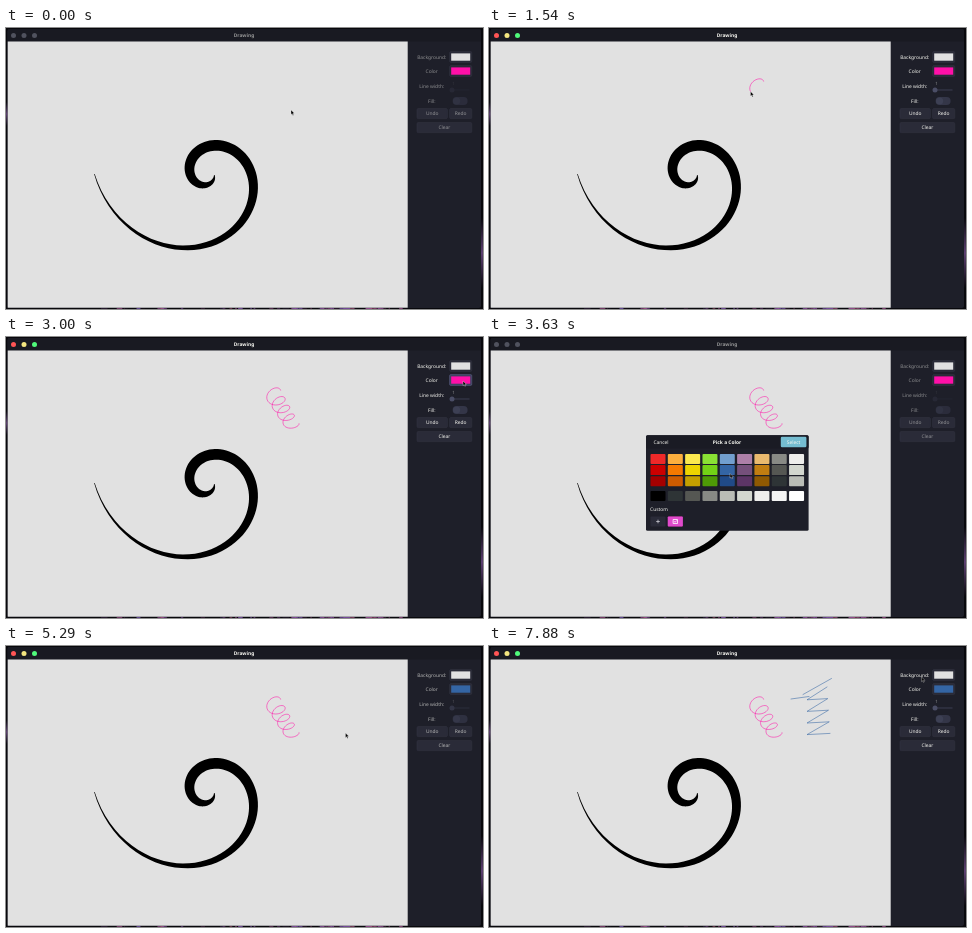
An HTML page that plays this animation: 477x281 px, repeating every 8 s.

```html
<!DOCTYPE html>
<html lang="en">
<head>
<meta charset="utf-8">
<title>Drawing</title>
<style>
  html, body { margin: 0; width: 100%; height: 100%; overflow: hidden; background: #08080c; }
  svg { display: block; width: 477px; height: 281px; }
  text {
    font: 4.9px "Noto Sans", "Open Sans", sans-serif;
    fill: #f8f8f2; text-anchor: middle; text-rendering: geometricPrecision;
  }
  .bold { font-weight: 700; }
  .box { fill: #2a2b38; stroke: #343645; stroke-width: .5; }
  .hover { fill: #3f4260; stroke: #62668f; }
  .pen { fill: none; stroke-width: .55; stroke-linecap: round; stroke-linejoin: round; }
</style>
</head>
<body>
<svg viewBox="0 0 477 281">
  <defs>
    <linearGradient id="glow" x2="0" y2="1">
      <stop offset="0" stop-color="#08080c"/>
      <stop offset=".5" stop-color="#5c3f70"/>
      <stop offset="1" stop-color="#08080c"/>
    </linearGradient>
  </defs>

  <!-- desktop showing around the window -->
  <rect width="477" height="281" fill="#08080c"/>
  <rect y="74" width="2" height="24" fill="url(#glow)"/>
  <rect x="475" y="190" width="2" height="70" fill="url(#glow)"/>
  <g id="specks"></g>

  <!-- window -->
  <rect x="1.5" y="1" width="473.5" height="279" rx="2" fill="#1e1f29"/>
  <path d="M1.5 13.5V3a2 2 0 0 1 2-2H473a2 2 0 0 1 2 2V13.5z" fill="#191a22"/>
  <g id="lights"></g>
  <text id="title" class="bold" x="238" y="9.3">Drawing</text>
  <rect x="1.7" y="13.5" width="400" height="266.2" fill="#e1e1e1"/>
  <path id="spiral"/>
  <g id="strokes"></g>

  <!-- side panel -->
  <g id="labels"></g>
  <g id="slider">
    <text x="447.5" y="56.5" style="font-size:4.4px" opacity=".5">1</text>
    <path d="M445 62H463.5" stroke="#3b3d50"/>
    <circle cx="446" cy="62" r="2.5" fill="#4b4e66"/>
  </g>
  <g id="wells"></g>
  <g id="toggle">
    <rect x="446.6" y="69" width="15" height="8" rx="4" fill="#343648"/>
    <circle cx="450.6" cy="73" r="3.6" fill="#3d4054"/>
  </g>
  <g id="buttons"></g>

  <!-- colour dialog -->
  <g id="dialog">
    <rect x="157" y="98.2" width="162.6" height="95.6" rx="1.5" fill="#1e1f29"/>
    <rect x="157" y="98.2" width="162.6" height="13.3" rx="1.5" fill="#1a1b24"/>
    <text x="172" y="106.8">Cancel</text>
    <text class="bold" x="238" y="106.8">Pick a Color</text>
    <rect x="291.8" y="99.8" width="25.6" height="10.4" rx="1.2" fill="#75bdd1"/>
    <text x="304.6" y="106.8">Select</text>
    <text x="170" y="173.7">Custom</text>
    <g id="swatches"></g>
    <path d="M167.2 184.5h3.6m-1.8-1.8v3.6" stroke="#c9cad2" stroke-width=".8"/>
    <g id="mark">
      <rect x="-7.6" y="-5" width="15.2" height="10" rx=".8" fill="#bd93f9" opacity=".45"/>
      <path d="M-2.2-2h4.4v4h-4.4zM-1.1-.2L-.2.8 1.5-1.1" fill="none" stroke="#fff" stroke-width=".8"/>
    </g>
  </g>

  <path id="cursor" d="M0 0V4.6L1.1 3.7 1.9 5.4 2.7 5 1.9 3.4 3.3 3.3z" fill="#000"
    stroke="#eee" stroke-width=".35" stroke-linejoin="round"/>
</svg>

<script>
const LOOP = 8000, PINK = '#ff10a8', BLUE = '#3465a4';
const ACTIVATE = 780, OPEN = 3100, PICK = 3780, CLOSE = 5280;
const $ = id => document.getElementById(id);
const clamp = v => Math.max(0, Math.min(1, v));
const ramp = (t, a, b) => clamp((t - a) / (b - a));
const mix = (a, b, f) => a + (b - a) * f;
const sample = (n, fn) => Array.from({ length: n + 1 }, (_, i) => fn(i / n, i));
const line = points => 'M' + points.join('L');

function set(el, attrs) {
  for (const k in attrs) el.setAttribute(k, attrs[k]);
  return el;
}

function add(parent, tag, attrs, text = '') {
  const el = set(document.createElementNS('http://www.w3.org/2000/svg', tag), attrs);
  el.textContent = text;
  return $(parent).appendChild(el);
}

// bright bits of wallpaper below the window
let seed = 7;
const random = () => (seed = seed * 16807 % 2147483647) / 2147483647;
for (let i = 0; i < 60; i++) {
  add('specks', 'rect', {
    x: 95 + 300 * random(), y: 280, width: 1 + 6 * random(), height: 1,
    fill: `hsl(${260 + 80 * random()} 35% 45%)`, opacity: random()
  });
}

// logarithmic spiral, thickest in the middle
function spiralEdge(side) {
  return sample(120, u => {
    const a = mix(.12, 3 * Math.PI, u);
    const r = 113 * Math.exp(.3 * (a - 3 * Math.PI)) + side * (.3 + 5.3 * Math.sin(Math.PI * u));
    return [201.4 + r * Math.cos(a), 146.1 + r * Math.sin(a)];
  });
}
set($('spiral'), { d: line([...spiralEdge(1), ...spiralEdge(-1).reverse()]) + 'z' });

const lights = ['#ff5555', '#f4e680', '#50fa7b'].map((color, i) =>
  ({ color, el: add('lights', 'circle', { cx: 7.5 + 10.5 * i, cy: 7.5, r: 2.5 }) }));

['Background:', 'Color', 'Line width:', 'Fill:'].forEach((s, i) =>
  add('labels', 'text', { x: 425.7, y: 30.7 + 14.7 * i }, s));

const wells = ['#e1e1e1', PINK].map((fill, i) => {
  const y = 23.6 + 14 * i;
  const frame = add('wells', 'rect', { class: 'box', x: 443.6, y, width: 22.2, height: 10.8, rx: 1.2 });
  const ink = add('wells', 'rect', { x: 445.2, y: y + 1.8, width: 19, height: 7.3, fill });
  return { y, frame, ink };
});

const captions = [['Undo', 411, 80.6, 30.4], ['Redo', 443.6, 80.6, 22.2], ['Clear', 411, 94.6, 54.8]]
  .map(([s, x, y, width]) => {
    add('buttons', 'rect', { class: 'box', x, y, width, height: 10, rx: 1.2 });
    return add('buttons', 'text', { x: x + width / 2, y: y + 6.7 }, s);
  });

const spot = (col, row) => [169 + 17.32 * col, [122, 133.1, 144.2, 159, 184.5][row]];
[
  'ef2929 fcaf3e fce94f 8ae234 729fcf ad7fa8 e9b96e 888a85 eeeeec',
  'cc0000 f57900 edd400 73d216 3465a4 75507b c17d11 555753 d3d7cf',
  'a40000 ce5c00 c4a000 4e9a06 204a87 5c3566 8f5902 2e3436 babdb6',
  '000000 2e3436 555753 888a85 babdb6 d3d7cf eeeeec f3f3f3 ffffff',
  '2a2b38 ff10a8'
].forEach((colors, row) => colors.split(' ').forEach((c, col) => {
  const [x, y] = spot(col, row);
  add('swatches', 'rect', { x: x - 7.5, y: y - 5, width: 15, height: 10, rx: .9, fill: '#' + c });
}));

// four shrinking, tilted loops sliding down to the right
const curl = sample(120, u => {
  const a = 8 * Math.PI * u;
  const x = mix(8, 6.5, u) * Math.cos(a), y = -mix(6, 4, u) * Math.sin(a);
  return [mix(266.5, 286.5, u) + x + .3 * y, mix(56, 89, u) + y - .35 * x];
});
const zigzag = sample(8, (u, i) => i % 2 ? [318, 48 + 5.8 * i] : [mix(338, 341, u), 41 + 5.8 * i]);

const strokes = [
  [1300, 2160, PINK, curl],
  [6090, 6262, BLUE, [[342.5, 32.5], [314, 48.5]]],
  [6280, 6450, BLUE, [[302, 53], [320, 50.5]]],
  [6480, 7220, BLUE, zigzag]
].map(([from, to, stroke, points]) => {
  const el = add('strokes', 'path', { class: 'pen', stroke, d: line(points) });
  return { from, to, el, points, len: el.getTotalLength() };
});

// pointer stops: time, x, y; the ends of each stroke join them
const stops = [
  [0, 285, 82], [ACTIVATE, 275, 52.5], [2440, 457, 44], [3000, 457, 44], [3600, 241, 136.5],
  [3920, 241, 136.5], [4630, 304, 105], [5060, 339, 95.5], [6060, 342.5, 32.5],
  [7410, 436, 31], [7700, 447, 30], [7870, 432.6, 31],
  ...strokes.flatMap(s => [[s.from, ...s.points[0]], [s.to, ...s.points.at(-1)]])
].sort((a, b) => a[0] - b[0]);

// screen refreshes: first, last, count
const refreshes = [
  [40, 1080, 23], [1420, 2460, 8], [3000, 3920, 7], [4080, 4080, 1],
  [4420, 5290, 5], [5500, 6460, 6], [6580, 7420, 6], [7710, 7880, 2]
];

function lastRefresh(t) {
  const run = refreshes.filter(r => r[0] <= t).pop();
  if (!run) return 0;
  const [a, b, n] = run;
  if (t >= b) return b;
  const step = (b - a) / (n - 1);
  return a + Math.floor((t - a) / step + 1e-6) * step;
}

function pointer(t) {
  const s = strokes.find(s => t >= s.from && t <= s.to);
  if (s) {
    const p = s.el.getPointAtLength(s.len * ramp(t, s.from, s.to));
    return [p.x, p.y];
  }
  const i = stops.findIndex(k => k[0] > t);
  if (i < 0) return stops.at(-1).slice(1);
  const [a, b] = [stops[i - 1], stops[i]], f = ramp(t, a[0], b[0]);
  const eased = f * f * (3 - 2 * f);
  return [mix(a[1], b[1], eased), mix(a[2], b[2], eased)];
}

function render(now) {
  const t = lastRefresh(now % LOOP);
  const active = t >= ACTIVATE && t < OPEN || t >= CLOSE;
  const lit = ramp(t, 880, 1060) - ramp(t, OPEN, OPEN + 350) + ramp(t, CLOSE - 80, CLOSE + 170);
  const [x, y] = pointer(t);

  lights.forEach(({ el, color }) => set(el, { fill: active ? color : '#50525e' }));
  set($('title'), { opacity: active ? 1 : .55 });
  [$('labels'), ...captions].forEach(el => set(el, { opacity: mix(.5, 1, lit) }));
  set($('slider'), { opacity: mix(.2, 1, lit) });
  set($('toggle'), { opacity: mix(.6, 1, lit) });
  set(wells[1].ink, { fill: t < CLOSE ? PINK : BLUE });
  wells.forEach(w => w.frame.classList.toggle('hover',
    active && x > 443.6 && x < 465.8 && y > w.y && y < w.y + 10.8));

  set($('dialog'), { opacity: t < CLOSE ? ramp(t, OPEN + 100, OPEN + 350) : 0 });
  set($('mark'), { transform: `translate(${t < PICK ? spot(1, 4) : spot(4, 1)})` });

  for (const { el, from, to, len } of strokes) {
    const f = ramp(t, from, to);
    set(el, { 'stroke-dasharray': `${len * f} ${len + 5}`, visibility: f > 0 ? 'visible' : 'hidden' });
  }
  set($('cursor'), { transform: `translate(${x} ${y})` });
}

const start = performance.now();
(function tick() {
  render(performance.now() - start);
  requestAnimationFrame(tick);
})();
</script>
</body>
</html>
```
